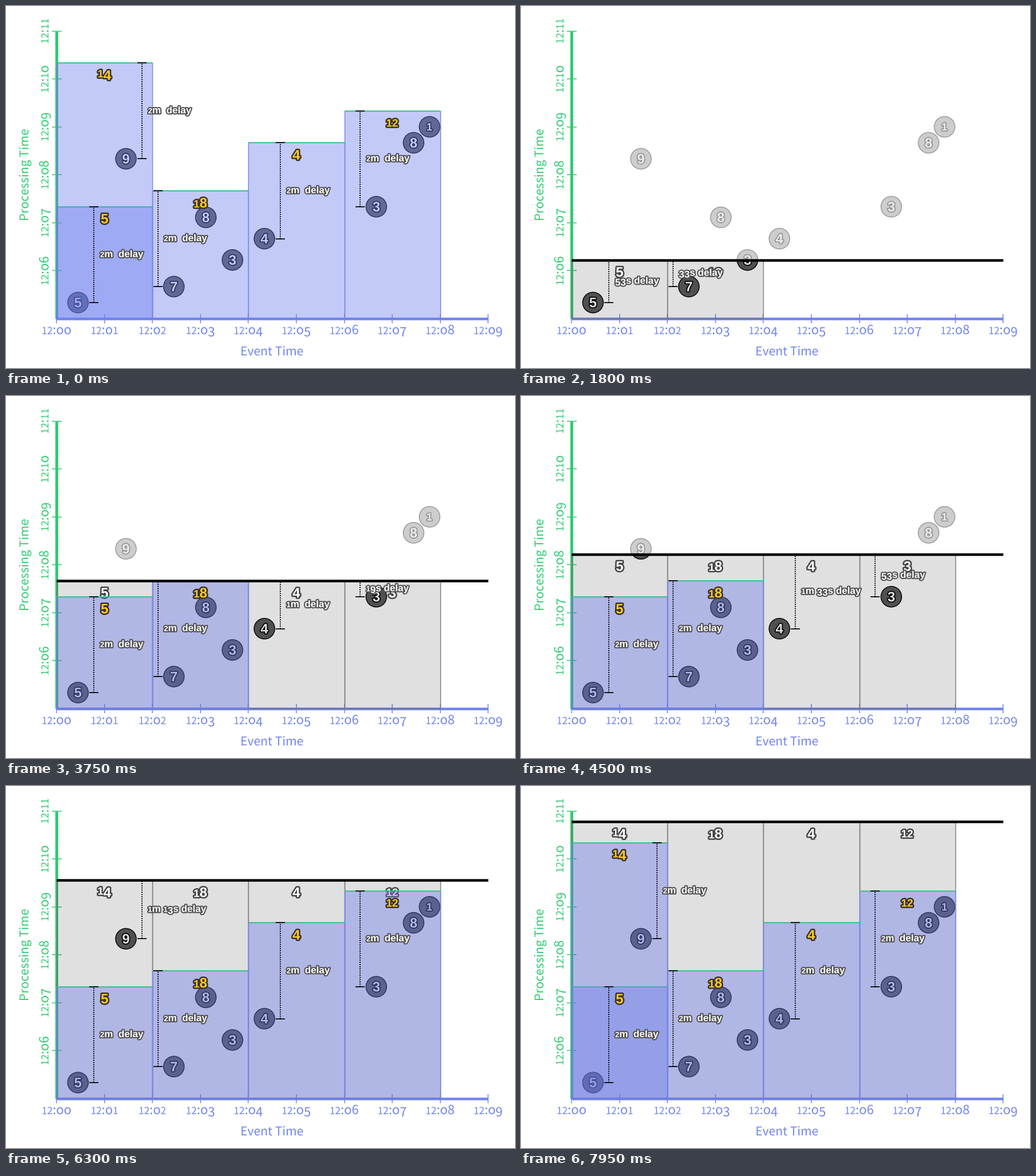
These frames come from a looping animation (887 px wide and 631 px high, 8000 ms). A matplotlib script:

```python
import matplotlib.pyplot as plt
from matplotlib.animation import FuncAnimation
from matplotlib.lines import Line2D
from matplotlib.patches import Circle, PathPatch, Rectangle
from matplotlib.path import Path
from matplotlib.textpath import TextPath
from matplotlib.transforms import Affine2D

W, H, DPI = 887, 631, 64   # a power of two keeps the pixel size exact
PX = 72 / DPI              # one pixel in points
X0, Y0, U = 88.3, 544.8, 9.283   # origin, and pixels per 1/9 minute
X1 = X0 + 81 * U
GREEN, BLUE = "#2ecc71", "#7184ee"
PANE_BLUE = (107 / 255, 123 / 255, 238 / 255)
PANE_GRAY = (0, 0, 0, 0.12)
GOLD = "#ffca28"
DELAY = 18                 # two minutes

# value, event time, processing time (in 1/9 minute)
EVENTS = [(5, 4, 3), (7, 22, 6), (3, 33, 11), (4, 39, 15), (8, 28, 19),
          (3, 60, 21), (9, 13, 30), (8, 67, 33), (1, 70, 36)]
# event time, processing time, side of the delay bar
TIMERS = [(4, 3, 1), (22, 6, -1), (39, 15, 1), (60, 21, -1), (13, 30, 1)]

fig = plt.figure(figsize=(W / DPI, H / DPI), dpi=DPI, facecolor="white")
ax = fig.add_axes([0, 0, 1, 1])
ax.set(xlim=(0, W), ylim=(H, 0))
ax.axis("off")

path_cache = {}
moving = []


def px(event_time):
    return X0 + event_time * U


def py(proc_time):
    return Y0 - proc_time * U


def add(artist):
    artist.set_zorder(1)
    ax.add_artist(artist)
    moving.append(artist)
    return artist


def line(xs, ys, color, width, style="-"):
    add(Line2D(xs, ys, color=color, lw=width * PX, ls=style,
               solid_capstyle="butt", dash_capstyle="butt"))


def text_path(text, size, bold):
    """Outline of the text, with old-style figures."""
    key = text, size, bold
    if key in path_cache:
        return path_cache[key]
    prop = ({"family": "Liberation Sans", "weight": "bold"} if bold
            else {"family": "Noto Sans CJK JP"})

    def outline(s, scale=1):
        return TextPath((0, 0), s, size=size * scale, prop=prop)

    parts, pen = [], 0
    bars = outline("||").get_extents().width
    for ch in text:
        glyph = "o" if ch == "0" else ch
        scale = 0.78 if ch in "12" else 1
        drop = -0.18 * size if ch in "34579" else 0
        if ch != " ":
            parts.append(outline(glyph, scale).transformed(
                Affine2D().translate(pen, drop)))
        pen += (outline(f"|{glyph}|").get_extents().width - bars) * scale
    path_cache[key] = Path.make_compound_path(*parts)
    return path_cache[key]


def write(text, x, y, size, color, bold=False, edge=None, edge_width=4.5,
          left=False, baseline=False, upright=False):
    path = text_path(text, size, bold)
    box = path.get_extents()
    ox = box.x0 if left else (box.x0 + box.x1) / 2
    oy = 0 if baseline else (box.y0 + box.y1) / 2
    place = (Affine2D().translate(-ox, -oy).scale(1, -1)
             .rotate_deg(-90 if upright else 0).translate(x, y))
    path = path.transformed(place)
    drawn = []
    if edge:
        drawn.append(add(PathPatch(path, fc=edge, ec=edge, lw=edge_width * PX,
                                   joinstyle="round")))
    drawn.append(add(PathPatch(path, fc=color, lw=0)))
    return drawn


def draw_axes():
    line([X0, X0], [Y0, py(54)], GREEN, 5)
    line([X0, X1], [Y0, Y0], BLUE, 4.5)
    for minute in range(10):
        x = px(9 * minute)
        line([x, x], [Y0 - 8, Y0 + 8], BLUE, 1.5)
        write(f"12:{minute:02}", x, 572, 22, BLUE, baseline=True)
    for minute in range(6, 12):
        y = py(9 * (minute - 5))
        line([X0 - 8, X0 + 9], [y, y], GREEN, 1.5)
        write(f"12:{minute:02}", 74, y, 22, GREEN, baseline=True, upright=True)
    write("Event Time", 464, 609, 21, BLUE, baseline=True)
    write("Processing Time", 39, 294, 21, GREEN, baseline=True, upright=True)


def draw_event(value, x, y, fill, edge, digit, clip_top=None):
    parts = [add(Circle((x, y), 18, fc=fill, ec=edge, lw=1.4 * PX))]
    parts += write(str(value), x, y, 24, digit, True, edge, 3.5)
    if clip_top is not None:
        clip = Rectangle((0, clip_top), W, H - clip_top, transform=ax.transData)
        for part in parts:
            part.set_clip_path(clip)


def draw_events(now):
    top = py(now)
    for value, event, proc in EVENTS:
        x, y = px(event), py(proc)
        if top > y - 18:
            draw_event(value, x, y, "#cdcdcd", "#969696", "#ebebeb")
        if top < y + 18:
            draw_event(value, x, y, "#5c5c5c", "black", "white", top)


def draw_pane(window, top, face, edge):
    x = px(18 * window)
    add(Rectangle((x, py(top)), 18 * U, top * U, fc=face, ec=edge, lw=1.4 * PX))


def window_sum(window, now):
    return sum(v for v, event, proc in EVENTS
               if event // 18 == window and proc <= now)


def draw_label(window, top, now, color, edge):
    write(str(window_sum(window, now)), px(18 * window + 9), py(top) + 21,
          24, color, True, edge, 5)


def delay_text(ninths):
    minutes, rest = divmod(ninths, 9)
    seconds = max(0, -(-rest * 60 // 9) - 1)
    if not minutes:
        return f"{seconds}s delay"
    return f"{minutes}m {f'{seconds}s' if seconds else ''} delay"


def draw_timer(event, proc, side, now):
    end = min(now, proc + DELAY)
    x, y, top = px(event) + 28 * side, py(proc), py(end)
    line([x, x], [y, top], "black", 1.9, (0, (1, 1)))
    line([x - 8, x + 8], [y, y], "black", 1.7)
    if now >= proc + DELAY:
        line([x - 8, x + 8], [top, top], "black", 1.7)
    write(delay_text(end - proc), x + 11, (y + top) / 2, 17, "white", True,
          "#505050", 4, left=True)


def update(frame):
    while moving:
        moving.pop().remove()
    step = frame // 3
    finished = step == 0
    now = 60 if finished else step - 1

    draw_events(now)
    if not finished:
        open_windows = [w for w in range(4) if window_sum(w, now)]
        for window in open_windows:
            draw_pane(window, now, PANE_GRAY, "#7c7c7c")
        for window in open_windows:
            draw_label(window, now, now, "white", "#444444")

    closed = [(event // 18, proc + DELAY) for event, proc, _ in TIMERS
              if proc + DELAY <= now]
    for window, top in closed:
        draw_pane(window, top, (*PANE_BLUE, 0.4), BLUE)
        line([px(18 * window), px(18 * window + 18)], [py(top)] * 2, GREEN, 1.5)
    for window, top in closed:
        draw_label(window, top, top, GOLD, "#3a3328")
    for event, proc, side in TIMERS:
        if proc < now:
            draw_timer(event, proc, side, now)
    if not finished:
        line([X0, X1], [py(now)] * 2, "black", 4.5)


draw_axes()
moving.clear()             # the axes stay in place

anim = FuncAnimation(fig, update, frames=160, interval=50, repeat=True,
                     repeat_delay=0, init_func=lambda: update(0),
                     cache_frame_data=False)
plt.show()
```
